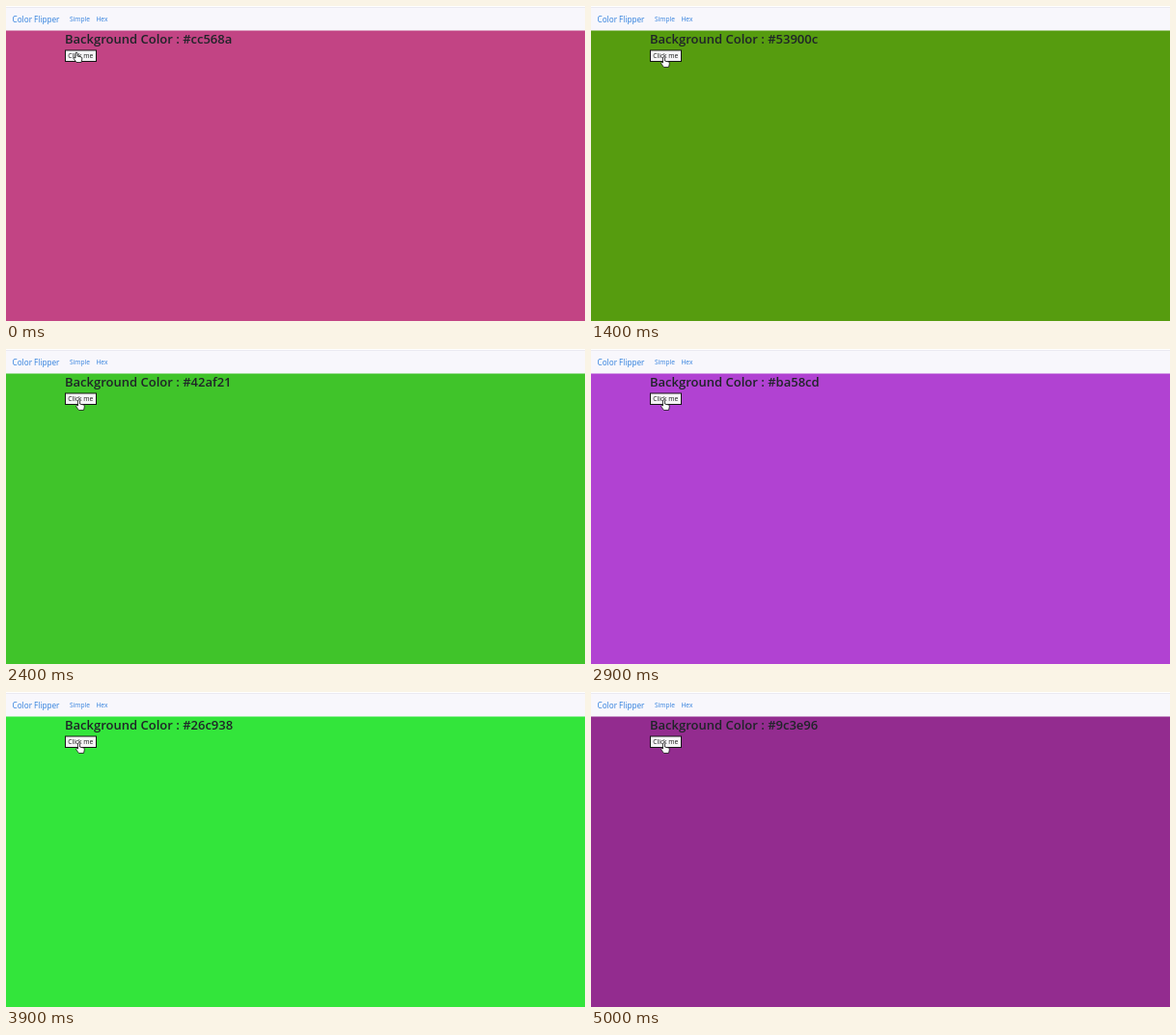
An HTML page that plays this animation: 600x327 px, repeating every 5100 ms.

```html
<!DOCTYPE html>
<html lang="en">
<head>
<meta charset="utf-8">
<title>Color Flipper</title>
<style>
  html, body { margin: 0; height: 100%; overflow: hidden; }
  svg { display: block; width: 600px; height: 327px; }
  text { font-family: "Open Sans", "Noto Sans", sans-serif; font-size: 6.6px; fill: #2f7fdd; white-space: pre; }
  .brand { font-size: 8.2px; }
  .title { font-size: 13px; font-weight: 600; fill: #1f2428; }
  .label { font-size: 6.7px; fill: #181818; }
</style>
</head>
<body>
<svg viewBox="0 0 600 327">
  <rect id="page" width="600" height="327"/>
  <rect width="600" height="25.5" fill="#f8f7fc"/>
  <rect width="600" height="1" fill="#fff"/>
  <rect y="1" width="600" height="1" fill="#ebeaf2"/>
  <text class="brand" x="6.5" y="17">Color Flipper</text>
  <text x="66" y="16.3">Simple</text>
  <text x="93.5" y="16.3">Hex</text>
  <text class="title" x="61" y="39">Background Color : <tspan id="hex"></tspan></text>
  <rect x="61.5" y="46" width="32" height="11.5" fill="#f5f4f6" stroke="#161616"/>
  <text class="label" x="64.3" y="54.3">Click me</text>
  <path id="hand" fill="#fff" stroke="#161616" stroke-width=".8" stroke-linejoin="round"
    d="M-1 .8Q0-.8 1 .8V4L5 5Q6 5.4 5.8 7L5 10.5H0L-3 6.5Q-3.2 5-1 6Z"/>
</svg>
<script>
const LOOP = 5100;
// start time, displayed hex, painted colour
const flips = [
  [0, "#cc568a", "#c24484"],
  [1000, "#53900c", "#569c0f"],
  [2000, "#42af21", "#40c42a"],
  [2600, "#ba58cd", "#b142d2"],
  [3300, "#a3be43", "#a5c84b"],
  [3900, "#26c938", "#33e53b"],
  [4500, "#9c3e96", "#932c8f"]
];
const [page, hex, hand] = ["page", "hex", "hand"].map(id => document.getElementById(id));

function draw(now) {
  const t = now % LOOP;
  const [, name, paint] = flips.findLast(([start]) => t >= start);
  page.setAttribute("fill", paint);
  if (hex.textContent !== name) hex.textContent = name;

  const p = Math.min(1, Math.floor(t / 100) / 6);
  const ease = p * p * (3 - 2 * p);
  hand.setAttribute("transform", `translate(${73 + 2.5 * ease} ${48 + 5 * ease})`);
  requestAnimationFrame(draw);
}
draw(0);
</script>
</body>
</html>
```
